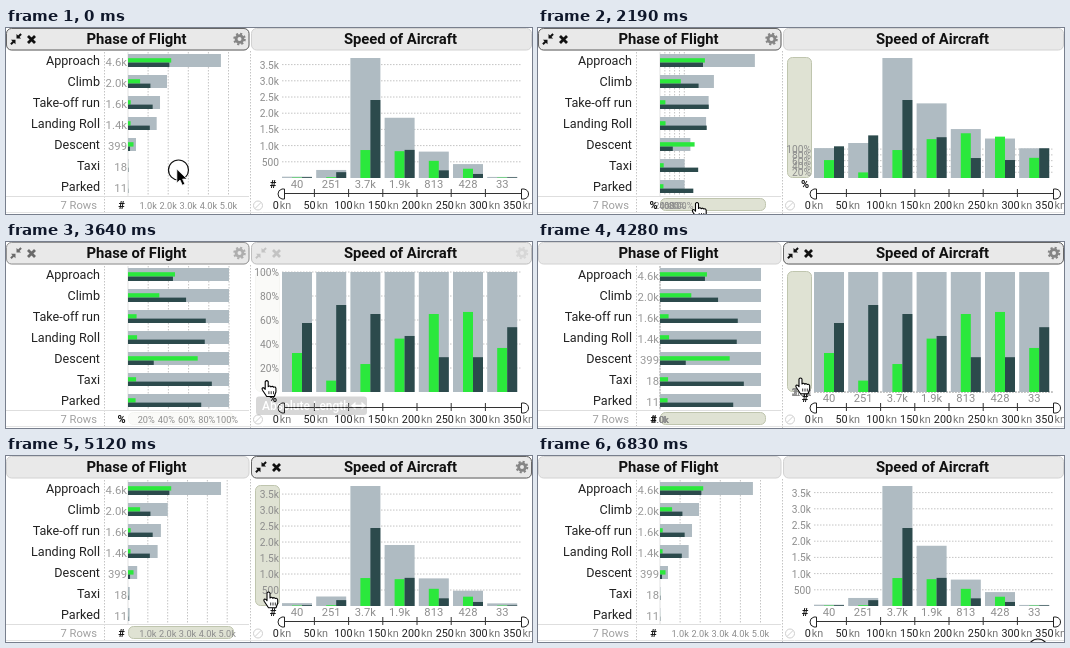
These frames come from a looping animation (526x186 px, 6.88 s). An HTML page:

```html
<!DOCTYPE html>
<html lang="en">
<head>
<meta charset="utf-8">
<title>Linked bar charts</title>
<style>
  html, body { margin: 0; width: 100%; height: 100%; overflow: hidden; background: #fff; }
  svg { display: block; width: 526px; height: 186px; font-family: Roboto, sans-serif; }
  .title { font-size: 14.8px; font-weight: 700; fill: #111; text-anchor: middle; }
  .row { font-size: 12.6px; fill: #222; text-anchor: end; }
  .count { font-size: 11.3px; fill: #999; text-anchor: end; }
  .bin { font-size: 11.2px; fill: #8e8e8e; text-anchor: middle; }
  .unit { font-size: 11px; font-weight: 700; fill: #111; text-anchor: middle; }
  .tick { fill: #8c8c8c; }
  .tip { font-size: 12px; font-weight: 500; fill: #fff; }
  .grid { stroke: #c4c4c4; stroke-dasharray: 1.5 1.5; }
  .hot { fill: #dfe2d3; stroke: #bfc5ae; }
</style>
</head>
<body>
<svg id="stage" viewBox="0 0 526 186"></svg>
<script>
const LOOP = 6880, TO_REL = 1790, TO_ABS = 4220, MORPH = 870;
const GREY = '#afbbc2', GREEN = '#2be83c', DARK = '#2c4a4c';
const LEFT = { x: 122, len: 101 }, RIGHT = { x: 276, y: 150, len: 120, step: 34.2 };

// label, count, total length, green share, dark share
const rows = [
  ['Approach', '4.6k', .92, .465, .445],
  ['Climb', '2.0k', .386, .31, .575],
  ['Take-off run', '1.6k', .317, .085, .77],
  ['Landing Roll', '1.4k', .284, .09, .76],
  ['Descent', '399', .079, .69, .255],
  ['Taxi', '18', .004, .08, .83],
  ['Parked', '11', .003, .075, .725]
];
const bins = [
  ['40', .011, .325, .575],
  ['251', .067, .095, .725],
  ['3.7k', 1, .233, .65],
  ['1.9k', .502, .445, .467],
  ['813', .22, .65, .29],
  ['428', .116, .667, .29],
  ['33', .009, .367, .54]
];

const svg = document.getElementById('stage');
function el(parent, name, attrs, text) {
  const node = document.createElementNS(svg.namespaceURI, name);
  set(node, attrs);
  if (text !== undefined) node.textContent = text;
  return parent.appendChild(node);
}
function set(node, attrs) {
  for (const key in attrs) node.setAttribute(key, attrs[key]);
}
const group = (parent = svg) => el(parent, 'g', {});
const rect = (parent, x, y, width, height, attrs) =>
  el(parent, 'rect', { x, y, width, height, ...attrs });
const text = (parent, cls, x, y, str) => el(parent, 'text', { class: cls, x, y }, str);
const line = (parent, x1, y1, x2, y2, attrs) =>
  el(parent, 'line', { x1, y1, x2, y2, ...attrs });
const path = (parent, d, attrs) => el(parent, 'path', { d, ...attrs });
const show = (node, on) => node.setAttribute('opacity', +on);

const mix = (a, b, p) => a + (b - a) * p;
const clamp = p => Math.max(0, Math.min(1, p));
const cubic = p => p < .5 ? 4 * p ** 3 : 1 - 4 * (1 - p) ** 3;
const smooth = p => p * p * (3 - 2 * p);

// Value of a [time, value] track at time t.
function track(keys, t, ease = p => p) {
  let prev = keys[0];
  for (const key of keys) {
    if (t < key[0]) {
      return key === prev ? key[1]
        : mix(prev[1], key[1], ease((t - prev[0]) / (key[0] - prev[0])));
    }
    prev = key;
  }
  return prev[1];
}

function header(x, w, title, center) {
  rect(svg, x, .5, w, 21.5, { rx: 5, fill: '#e9e9e9', stroke: '#d2d2d2' });
  const hover = group();
  rect(hover, x, .5, w, 21.5, { rx: 5, fill: 'none', stroke: '#666' });
  text(svg, 'title', center, 15.8, title);
  const ix = x + 9, gx = x + w - 9.5;
  path(hover, `M${ix + 1} 10.500V6l1.600 1.600 2.300-2.300 1.400 1.400-2.300 2.300 1.600 1.600z` +
    `M${ix} 11.700v4.600l-1.600-1.600-2.300 2.300-1.400-1.400 2.300-2.300-1.600-1.600z`, { fill: '#111' });
  path(hover, `M${ix + 12.5} 8l7 7m0-7l-7 7`, { stroke: '#111', 'stroke-width': 2.8 });
  el(hover, 'circle', { cx: gx, cy: 11, r: 3.4, fill: 'none', stroke: '#858585', 'stroke-width': 2.8 });
  el(hover, 'circle', { cx: gx, cy: 11, r: 5.3, fill: 'none', stroke: '#858585',
    'stroke-width': 2, 'stroke-dasharray': '2.1 2.06' });
  return hover;
}

function tooltip(x, y, w, str) {
  const g = group();
  rect(g, x, y, w, 18.5, { rx: 3, fill: '#000' });
  text(g, 'tip', x + 6, y + 13.5, str);
  const ax = x + w - 16, ay = y + 9.3;
  path(g, `M${ax} ${ay}l4.500-4v3h6v-3l4.500 4-4.500 4v-3h-6v3z`, { fill: '#fff' });
  return g;
}

// Ticks for one unit; each has a grid line and a label.
function ticks(labels, vertical) {
  const g = group();
  const anchor = vertical ? 'end' : 'middle', size = vertical ? 10.2 : 9.2;
  const items = labels.map(str => ({
    grid: line(g, 0, 0, 0, 0, { class: 'grid' }),
    label: el(g, 'text', { class: 'tick', 'text-anchor': anchor, 'font-size': size }, str)
  }));
  return { g, items, vertical };
}
function placeTicks(axis, on, step, nudge) {
  show(axis.g, on);
  axis.items.forEach(({ grid, label }, i) => {
    const d = (i + 1) * step;
    if (axis.vertical) {
      const y = RIGHT.y - d;
      set(grid, { x1: 276, x2: 515, y1: y, y2: y });
      set(label, { x: 273, y: y + 4 });
    } else {
      const x = LEFT.x + d;
      set(grid, { x1: x, x2: x, y1: 24, y2: 168 });
      set(label, { x: x - nudge, y: 180.5 });
    }
  });
}

// Frame lines
const hoverL = header(.5, 242.5, 'Phase of Flight', 130.5);
const hoverR = header(245.5, 280, 'Speed of Aircraft', 394.5);
line(svg, 98.5, 24, 98.5, 186, { class: 'grid' });
line(svg, 244.5, 23, 244.5, 186, { class: 'grid' });
line(svg, 0, 168.5, 243, 168.5, { stroke: '#dedede' });
line(svg, 0, 184.5, 526, 184.5, { stroke: '#e4e4e4' });

const hot = group();
rect(hot, 122.5, 170.5, 105, 12, { rx: 5, class: 'hot' });
rect(hot, 249.5, 29.5, 24, 120, { rx: 5, class: 'hot' });

const percents = [20, 40, 60, 80, 100].map(n => n + '%');
const relL = ticks(percents), relR = ticks(percents, true);
const absL = ticks([1, 2, 3, 4, 5].map(n => n + '.0k'));
const absR = ticks(['500', '1.0k', '1.5k', '2.0k', '2.5k', '3.0k', '3.5k'], true);

// Left chart
const counts = group();
line(svg, 122, 24, 122, 168, { stroke: '#d4d4d4', 'stroke-width': .7 });
const bars = rows.map(([name, count], i) => {
  const y = 26 + 21 * i;
  text(svg, 'row', 94, y + 11.3, name);
  text(counts, 'count', 121, y + 11.5, count);
  return [
    rect(svg, LEFT.x, y, 0, 13, { fill: GREY }),
    rect(svg, LEFT.x, y + 4.2, 0, 4.4, { fill: GREEN }),
    rect(svg, LEFT.x, y + 8.6, 0, 4.4, { fill: DARK })
  ];
});
el(svg, 'text', { x: 54.5, y: 181.3, fill: '#a0a0a0', 'font-size': 11.2 }, '7 Rows');
const unitL = text(svg, 'unit', 115.5, 181, '#');

// Right chart
const columns = bins.map(([count], i) => {
  const x = RIGHT.x + RIGHT.step * i;
  text(counts, 'bin', x + 15, 160, count);
  return [
    rect(svg, x, 0, 30, 0, { fill: GREY }),
    rect(svg, x + 10, 0, 10, 0, { fill: GREEN }),
    rect(svg, x + 20, 0, 10, 0, { fill: DARK })
  ];
});
const unitR = text(svg, 'unit', 267, 160, '#');
line(svg, 279, 165.5, 515, 165.5, { stroke: '#333' });
for (let i = 0; i < 8; i++) {
  if (i && i < 7) {
    const x = 274.2 + RIGHT.step * i;
    line(svg, x, 161, x, 169, { stroke: '#333' });
  }
  const label = el(svg, 'text', { x: 276 + 33.8 * i, y: 181, 'font-size': 10.8, 'text-anchor': 'middle' });
  el(label, 'tspan', { fill: '#222' }, 50 * i);
  el(label, 'tspan', { fill: '#777', dx: 1 }, 'kn');
}
const knob = { fill: '#fff', stroke: '#222' };
path(svg, 'M278.500 161v10h-2.500q-4-1-4-5t4-5z', knob);
path(svg, 'M515.500 161v10h2.500q4.500-1 4.500-5t-4.500-5z', knob);
el(svg, 'circle', { cx: 252, cy: 177.5, r: 4.5, fill: 'none', stroke: '#cfcfcf' });
line(svg, 249, 180.5, 255, 174.5, { stroke: '#cfcfcf' });

// Overlays
const tipPart = tooltip(16, 167.5, 100, 'Part-Of Length');
path(tipPart, 'M115.500 172l5.500 4.700-5.500 4.700z', { fill: '#000' });
const tipAbs = tooltip(250, 154.5, 111, 'Absolute Length');
const cursor = group(), arrow = group(cursor), hand = group(cursor);
el(arrow, 'circle', { cx: 2.5, cy: 2, r: 10, fill: 'none', stroke: '#111', 'stroke-width': 1.2 });
path(arrow, 'M.8 1v14l3.200-3 2.300 5.200 2.600-1.100-2.300-5h4.500z',
  { fill: '#000', stroke: '#fff', 'stroke-width': .8 });
path(hand, 'M-2 0q1.500-2 3 0v5q1.500-1.500 2.700.2 1.600-1.200 2.600.3 2-.8 2.400 1.300v3.500l-1.700 4.500h-7.500l-4-6q-1.400-2.300.2-2.800 1.200 0 2.300 1.700z',
  { fill: '#fff', stroke: '#000', 'stroke-width': 1.1, 'stroke-linejoin': 'round' });
path(hand, 'M1.700 9.500v3m2.300-3v3m2.300-3v3', { stroke: '#000', 'stroke-width': .8 });

// Timelines
const posX = [[60, 170], [540, 170], [680, 159.5], [3300, 159.5], [3600, 261], [3800, 263],
  [5180, 263], [5590, 170], [6240, 170], [6830, 497.5]];
const posY = [[60, 140], [360, 170], [540, 170], [680, 175.5], [3300, 175.5], [3600, 140], [3800, 137],
  [5180, 137], [5590, 140], [6240, 140], [6830, 191]];
const hoverLeft = [[3420, 1], [3950, 0], [5540, 0], [6040, 1], [6280, 1], [6780, 0]];
const hoverRight = [[3560, 0], [4040, 1], [5450, 1], [5950, 0]];
const axisGlow = [[560, 0], [1000, 1], [3320, 1], [3640, .15], [3980, 1], [5450, 1], [5950, 0]];
const partTip = [[560, 0], [1000, 1]];
const absTip = [[3580, 0], [3980, 1]];

// Share of the way to relative lengths, given the delay after a click.
const morph = (t, delay) =>
  cubic(clamp((t - TO_REL - delay) / MORPH)) - cubic(clamp((t - TO_ABS - 100 - delay) / MORPH));

function draw(t) {
  const rel = t >= TO_REL && t < TO_ABS;
  const total = morph(t, 60), part = morph(t, -20);
  const sizes = (abs, green, dark) =>
    [mix(abs, 1, total), green * mix(abs, 1, part), dark * mix(abs, 1, part)];

  rows.forEach(([, , ...v], i) => sizes(...v).forEach((s, k) =>
    set(bars[i][k], { width: s * LEFT.len })));
  bins.forEach(([, ...v], i) => sizes(...v).forEach((s, k) =>
    set(columns[i][k], { y: RIGHT.y - s * RIGHT.len, height: s * RIGHT.len })));

  placeTicks(relL, rel, LEFT.len / 5 * total, 2);
  placeTicks(relR, rel, RIGHT.len / 5 * total);
  placeTicks(absL, !rel, 20.1 * (1 - total), 0);
  placeTicks(absR, !rel, 16.2 * (1 - total));
  show(counts, !rel);
  unitL.textContent = unitR.textContent = rel ? '%' : '#';

  show(hoverL, track(hoverLeft, t));
  show(hoverR, track(hoverRight, t));
  show(hot, track(axisGlow, t));
  show(tipPart, t < TO_REL ? track(partTip, t) : 0);
  show(tipAbs, t < TO_ABS ? track(absTip, t) : 0);

  const onAxis = t >= 560 && t < 3340 || t >= 3570 && t < 5230;
  show(hand, onAxis);
  show(arrow, !onAxis);
  set(cursor, { transform: `translate(${track(posX, t, smooth)} ${track(posY, t, smooth)})` });
}

const start = performance.now();
function frame() {
  draw((performance.now() - start) % LOOP);
  requestAnimationFrame(frame);
}
frame();
</script>
</body>
</html>
```
